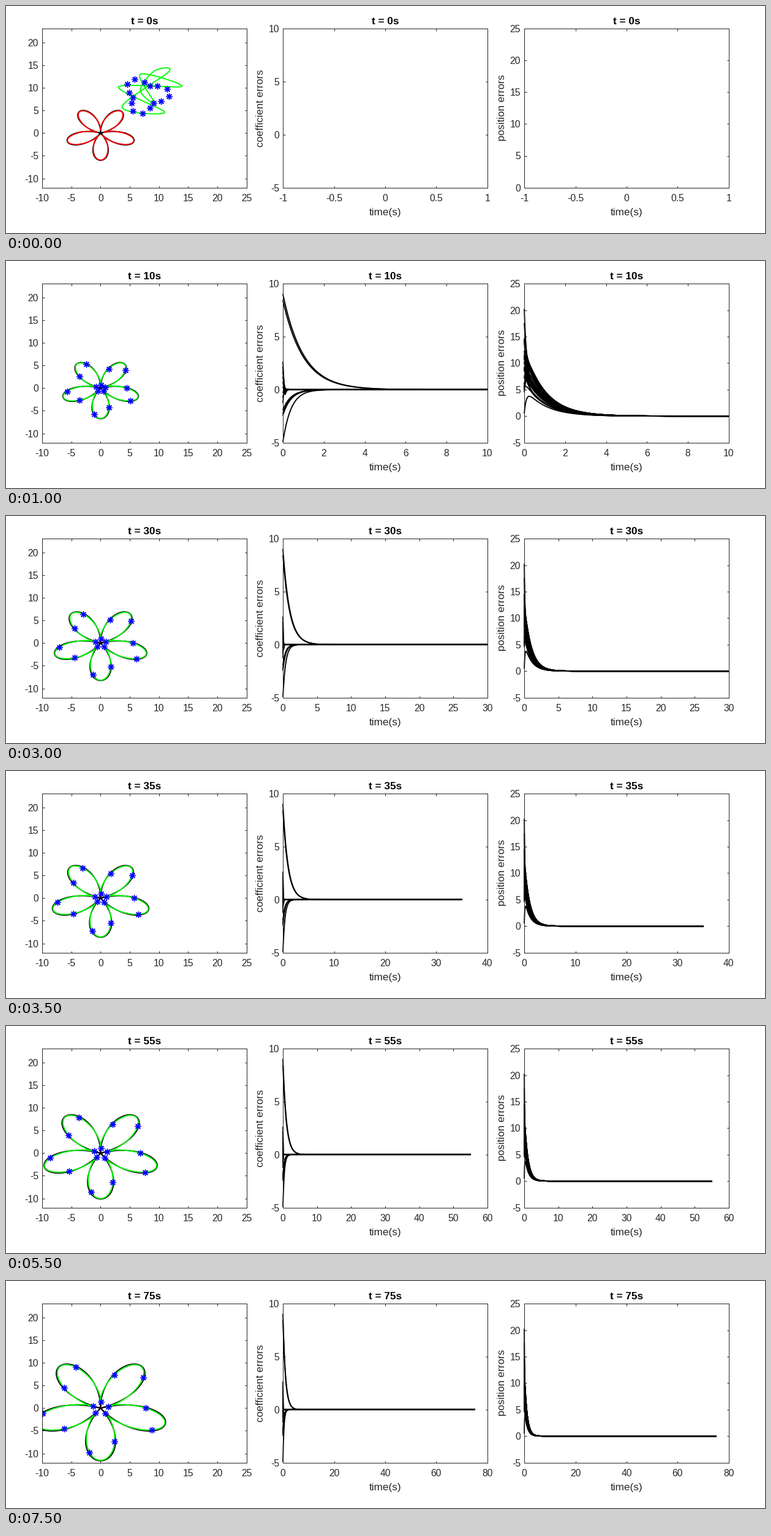
Recreate the animation shown at these times as a matplotlib script. Size 1239 by 372 pixels, loop 8000 ms.

```python
import numpy as np
import matplotlib as mpl
import matplotlib.pyplot as plt
from matplotlib.animation import FuncAnimation

W, H = 1239, 372
TOP, BOTTOM, WIDTH = 37.5, 297.5, 333.6
FRAMES, INTERVAL, STEP = 16, 500, 5
GREY = "#262626"

mpl.rcParams.update({"font.family": "Liberation Sans", "axes.unicode_minus": False,
                     "axes.edgecolor": GREY, "axes.linewidth": 1,
                     "lines.linewidth": 1.9, "path.simplify": False})
fig = plt.figure(figsize=(W / 72, H / 72), dpi=72, facecolor="white")


def label(x, y, text, **kw):
    opts = dict(ha="center", va="baseline", size=17.1, color=GREY)
    return fig.text(x / W, 1 - y / H, text, **{**opts, **kw})


def panel(left, xlim, ylim, ystep, xlabel="", ylabel=""):
    ax = fig.add_axes([left / W, 1 - BOTTOM / H, WIDTH / W, (BOTTOM - TOP) / H])
    ax.set(xlim=xlim, ylim=ylim)
    ax.yaxis.set_major_locator(mpl.ticker.MultipleLocator(ystep))
    ax.tick_params(direction="in", top=True, right=True, length=3.5, width=1,
                   color=GREY, labelcolor=GREY, labelsize=15.6)
    ax.tick_params(axis="x", pad=10)
    ax.tick_params(axis="y", pad=6)
    ax.xaxis.set_major_formatter("{x:g}")
    ax.yaxis.set_major_formatter("{x:g}")
    mid = left + WIDTH / 2 + 0.5
    label(mid, 343, xlabel)
    label(left - 32.5, 167, ylabel, rotation=90, rotation_mode="anchor")
    return ax, label(mid, 30, "", weight="bold", color="black")


shape_ax, title1 = panel(59.1, (-10, 25), (-12, 23), 5)
coef_ax, title2 = panel(452.1, (-1, 1), (-5, 10), 5, "time(s)", "coefficient errors")
pos_ax, title3 = panel(846.1, (-1, 1), (0, 25), 5, "time(s)", "position errors")
shape_ax.xaxis.set_major_locator(mpl.ticker.MultipleLocator(5))


# --- contours as complex numbers ---
theta = np.linspace(0, 2 * np.pi, 1201)
TIP = np.radians(54)
flower = np.abs(np.cos(2.5 * (theta - TIP))) * np.exp(1j * theta)


def fourier(p):
    """Three-harmonic approximation of the unit flower."""
    return (0.546 * np.exp(1j * p) - 0.2025j * np.exp(-4j * p)
            + 0.2415j * np.exp(6j * p))


def closed_spline(pts, n):
    """Periodic Catmull-Rom curve through pts, sampled n times."""
    s = np.linspace(0, len(pts), n)
    k = np.floor(s).astype(int)
    u = s - k
    a, b, c, d = (pts[(k + j) % len(pts)] for j in (-1, 0, 1, 2))
    return b + 0.5 * u * (c - a + u * (2 * a - 5 * b + 4 * c - d
                                       + u * (3 * (b - c) + d - a)))


# Lobe tips of the starting curve, in drawing order.
tips = np.array([3.1 + 10.2j, 13.9 + 10.3j, 6.8 + 13j, 9.2 + 6.7j, 6.8 + 9.5j,
                 9.2 + 13.7j, 11.7 + 13.6j, 3.7 + 5.8j, 11 + 4.6j])
tangle = closed_spline(tips, theta.size)
approx = fourier(theta)

# Agents start on a loose three-lobed ring and end on the flower.
turn = np.radians(24 * np.arange(15))
ring = turn + np.radians(22)
agents = 7.7 + 8.3j + (3.2 + np.cos(3 * ring - 0.5)) * np.exp(1j * ring)
slots = fourier(turn + np.radians(-3.1))


# --- error curves ---
rng = np.random.default_rng(4)
OFFSETS = (9, 8.4)
SLOW = (-4.9, -2.4, -2.2, -1.9)
FAST = [(v, rng.uniform(8, 16), rng.uniform(10, 40)) for v in np.linspace(2.6, -1.2, 9)]
STARTS = np.append(rng.uniform(3, 15, 30), (0.6, 17.5, 20.2))
PEAKS = np.append(rng.uniform(6, 13.2, 30), (5.3, 11, 9))


def coef_errors(s):
    return ([v * np.exp(-s) for v in OFFSETS]
            + [v * np.exp(-2.5 * s) for v in SLOW]
            + [v * np.exp(-k * s) * np.cos(w * s) for v, k, w in FAST])


def pos_errors(s):
    return [b * np.exp(-s) + (v - b) * np.exp(-10 * s) for v, b in zip(STARTS, PEAKS)]


def curves(ax, n):
    return [ax.plot([], [], color="black", clip_on=False)[0] for _ in range(n)]


black, red, green = (shape_ax.plot([], [], color=c)[0] for c in ("black", "red", "lime"))
stars, = shape_ax.plot([], [], ls="", marker=(8, 2, 0), ms=10.5, mew=1.4,
                       mec="blue", mfc="none")
error_lines = (curves(coef_ax, len(coef_errors(0)))
               + curves(pos_ax, len(STARTS)))


def time_ticks(t):
    if t == 0:
        return np.linspace(-1, 1, 5)
    step = next(s for s, end in ((1, 5), (2, 10), (5, 30), (10, 60), (20, 100)) if t <= end)
    return step * np.arange(np.ceil(t / step) + 1)


def draw(i):
    t = i * STEP
    size = 6 + 0.075 * t
    left = np.exp(-t)

    for line, z in ((black, size * flower), (red, size * approx),
                    (green, size * approx + (tangle - size * approx) * left),
                    (stars, size * slots + (agents - size * slots) * left)):
        line.set_data(z.real, z.imag)
    red.set_visible(t == 0)

    s = t * np.linspace(0, 1, 700) ** 3
    for line, y in zip(error_lines, coef_errors(s) + pos_errors(s)):
        line.set_data(s, y)
        line.set_visible(t > 0)

    ticks = time_ticks(t)
    for ax in (coef_ax, pos_ax):
        ax.set_xticks(ticks)
        ax.set_xlim(ticks[0], ticks[-1])
    pos_ax.set_ylim(-5 if t else 0, 25)
    for title in (title1, title2, title3):
        title.set_text(f"t = {t}s")


anim = FuncAnimation(fig, draw, frames=FRAMES, interval=INTERVAL, repeat=True,
                     repeat_delay=0, blit=False)
plt.show()
```
